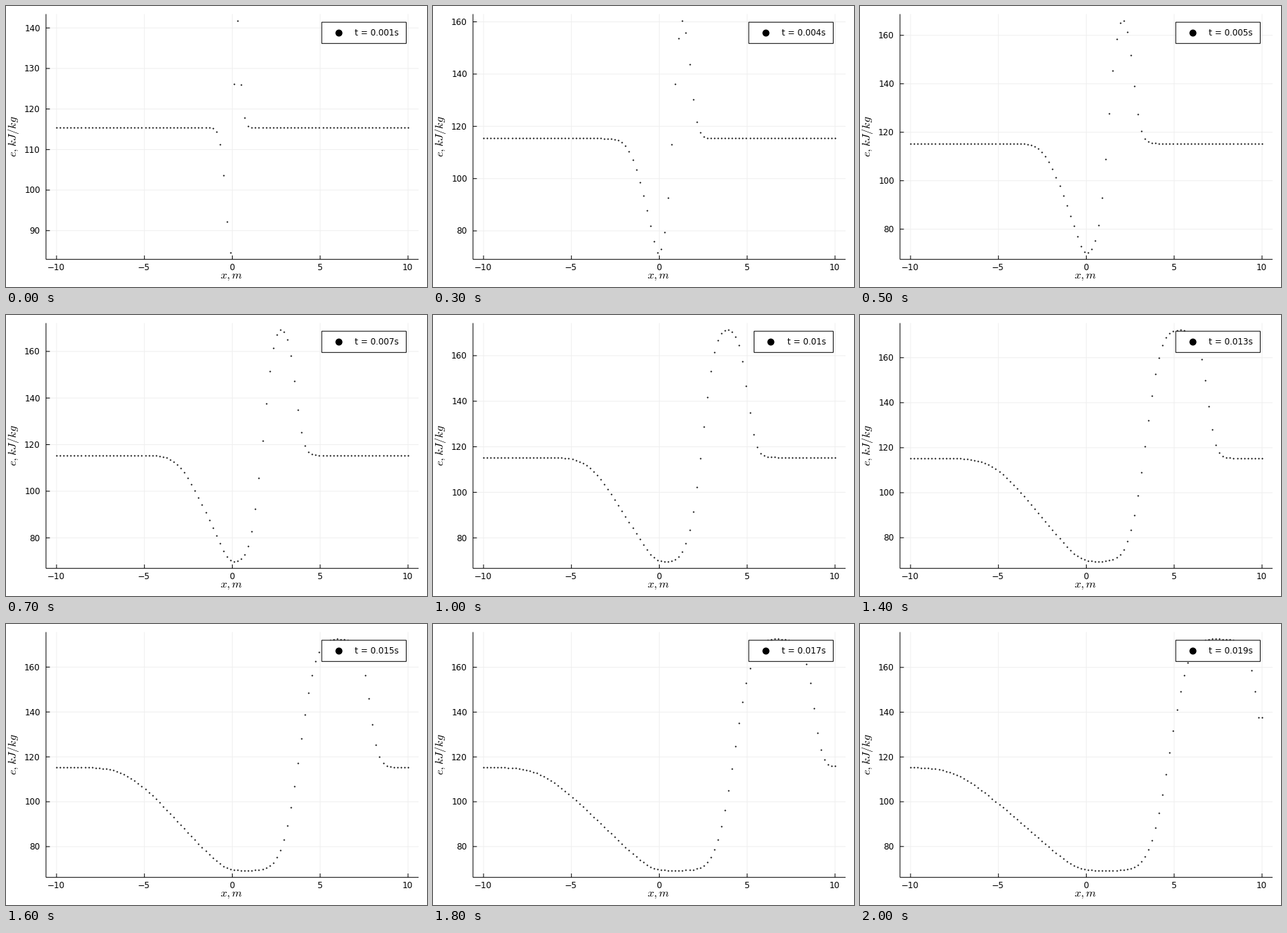
A matplotlib script that plays this animation: 600x400 px, repeating every 2.1 s.

```python
import math

import numpy as np
import matplotlib.pyplot as plt
from matplotlib.animation import FuncAnimation
from matplotlib.patches import Rectangle

W, H, DPI = 600, 400, 100
PT = 72 / DPI                      # points per pixel
LEFT, RIGHT, TOP, BOTTOM = 57, 588, 11.5, 360.7
FRAMES, N = 21, 100
E0, SHOCK_RISE, E_FAN = 115.385, 57.4, 92.0

x = np.linspace(-10, 10, N)
cell = np.arange(N)
erf = np.vectorize(math.erf)


def cdf(z):
    return 0.5 * (1 + erf(z / math.sqrt(2)))


def ramp(s, width):
    """Ramp max(s, 0) smoothed by a Gaussian."""
    z = s / width
    return width * (np.exp(-z * z / 2) / math.sqrt(2 * math.pi) + z * cdf(z))


def energy(k):
    """Internal energy along the tube: fan, contact and shock."""
    start = math.exp(-k)

    # rarefaction fan, positions in cells
    floor = 69.18 + 0.45 * math.exp(-k / 15) + 5.4 * start ** 2
    head = 46.45 - 1.66 * k - 0.001 * k * k
    mid = 48.06 - 0.91 * k + 0.0005 * k * k
    slope = (E0 - E_FAN) / (mid - head)
    tail = mid + (E_FAN - floor) / slope
    head_w = math.sqrt(1.44 + 1.85 * k)
    tail_w = 0.3 + 2.6 * (1 - math.exp(-(k / 10) ** 2.5))
    fan = E0 - slope * (ramp(cell - head, head_w) - ramp(cell - tail, tail_w))

    # shock
    q = 0.8 + 0.37 * math.exp(-k / 4.5)
    r = 0.02 + 0.13 * start
    s = cell - (51.015 + 2.3215 * k - 0.12 * start)
    s = np.maximum(s, -q / (2 * r))
    shock = E0 + SHOCK_RISE / (1 + np.exp(q * s + r * s * s))

    # contact blends the two sides
    w = (cell - (49.83 + 1.168 * k - 0.0007 * k * k)) / math.sqrt(0.28 + 0.87 * k)
    w = np.maximum(w, -9)
    mix = cdf(w + 0.033 * w * w)

    e = fan * (1 - mix) + shock * mix
    e[0], e[-1] = e[1], e[-2]
    return e


def px(v):
    return LEFT + (v + 10.6) / 21.2 * (RIGHT - LEFT)


fig = plt.figure(figsize=(W / DPI, H / DPI), dpi=DPI, facecolor="white")
ax = fig.add_axes([0, 0, 1, 1])
ax.set_xlim(0, W)
ax.set_ylim(H, 0)
ax.axis("off")


def line(x0, y0, x1, y1, color="black", z=2):
    return ax.plot([x0, x1], [y0, y1], color=color, lw=PT, zorder=z,
                   solid_capstyle="butt", snap=False)[0]


def markers(size, z):
    return ax.plot([], [], "o", color="black", ms=size * PT, mew=0,
                   zorder=z, snap=False)[0]


def label(tx, ty, s, size=12, **kw):
    return ax.text(tx, ty, s, fontsize=size * PT, family="DejaVu Sans",
                   va="baseline", **kw)


GRID = "#efefef"
for v in (-10, -5, 0, 5, 10):
    line(px(v), TOP, px(v), BOTTOM, GRID, 1)
    line(px(v), BOTTOM - 5.5, px(v), BOTTOM)
    label(px(v) - 0.7, 375.9, str(v).replace("-", "\u2212"), ha="center")
line(LEFT, TOP, LEFT, BOTTOM)
line(LEFT, BOTTOM, RIGHT, BOTTOM)

label(321.6, 388, "$x, m$", 16.4, ha="center", math_fontfamily="cm")
label(14.6, 185.6, "$e, kJ/kg$", 16.4, ha="center", rotation=90,
      rotation_mode="anchor", math_fontfamily="cm")

ticks = [(line(LEFT, 0, RIGHT, 0, GRID, 1), line(LEFT, 0, LEFT + 5.5, 0),
          label(48.8, 0, "", ha="right")) for _ in range(9)]
dots = markers(2.1, 3)

box = ax.add_patch(Rectangle((450, 23.1), 120.4, 30.2, fc="white", ec="black",
                             lw=PT, zorder=4, snap=False))
key = markers(10, 5)
clock = label(0, 42.3, "", zorder=5)


def draw(k):
    e = energy(k)
    pad = 0.03 * (e.max() - e.min())
    lo, hi = e.min() - pad, e.max() + pad

    def py(v):
        return BOTTOM - (v - lo) / (hi - lo) * (BOTTOM - TOP)

    dots.set_data(px(x), py(e))

    step = 10 if hi - lo < 80 else 20
    values = list(range(math.ceil(lo / step) * step, math.floor(hi) + 1, step))
    for i, (grid, tick, text) in enumerate(ticks):
        shown = i < len(values)
        for part in (grid, tick, text):
            part.set_visible(shown)
        if shown:
            y = py(values[i])
            grid.set_ydata([y, y])
            tick.set_ydata([y, y])
            text.set_y(y + 4.4)
            text.set_text(str(values[i]))

    caption = f"t = {round(0.0009 * (k + 1), 3)}s"
    left = 450 + 7.6 * (10 - len(caption))
    box.set_x(left)
    box.set_width(570.4 - left)
    key.set_data([left + 23.7], [38.3])
    clock.set_x(left + 47)
    clock.set_text(caption)
    return []


anim = FuncAnimation(fig, draw, frames=FRAMES, interval=100, repeat=True,
                     init_func=lambda: draw(0))
plt.show()
```
